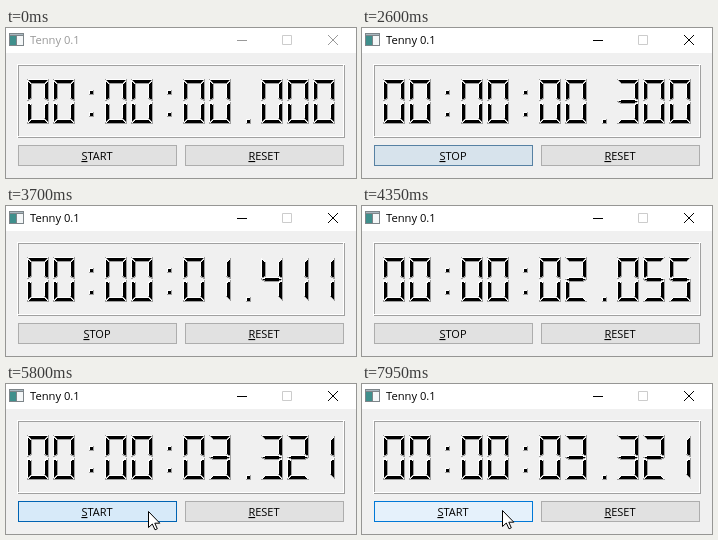
Animation, 350 px wide and 150 px high, one loop 8000 ms. Source, as an HTML page:

```html
<!DOCTYPE html>
<html>
<head>
<meta charset="utf-8">
<title>Stopwatch</title>
<style>
html, body { margin: 0; width: 100%; height: 100%; overflow: hidden; background: #f0f0f0; }
svg { display: block; }
text { font-family: "Open Sans", "Noto Sans", sans-serif; }
.label { font-size: 11px; text-anchor: middle; }
.key { text-decoration: underline; }
.crisp { shape-rendering: crispEdges; }
</style>
</head>
<body>
<svg width="350" height="150" viewBox="0 0 350 150">
  <rect width="350" height="150" fill="#f0f0f0"/>
  <rect width="350" height="25" fill="#fff"/>

  <g class="crisp">
    <rect x="3" y="5" width="15" height="13" fill="#7d8589"/>
    <rect x="4" y="6" width="13" height="1" fill="#a9b8c0"/>
    <rect x="4" y="8" width="6" height="9" fill="#3f8f8c"/>
    <rect x="11" y="8" width="6" height="9" fill="#f4f7f8"/>
  </g>
  <text id="title" x="24" y="16" font-size="11.2">Tenny 0.1</text>
  <g id="controls" fill="none">
    <path d="M231 12.5h10"/>
    <path d="M276.5 7.5h9v9h-9z" stroke="#ccc"/>
    <path d="M322 7l10 10M332 7l-10 10"/>
  </g>

  <g class="crisp" fill="none">
    <path d="M11.5 109.5V36.5H338.5M337.5 37V108.5H12" stroke="#fff"/>
    <path d="M12.5 108V37.5H337M338.5 37V109.5H12" stroke="#a0a0a0"/>
  </g>
  <g id="lcd" class="crisp" stroke-linecap="square"></g>

  <rect id="toggle" x="12.5" y="117.5" width="158" height="20"/>
  <text class="label" x="91" y="132"><tspan class="key">S</tspan><tspan id="rest">TART</tspan></text>
  <rect x="179.5" y="117.5" width="158" height="20" fill="#e1e1e1" stroke="#adadad"/>
  <text class="label" x="258" y="132"><tspan class="key">R</tspan>ESET</text>

  <path id="cursor" d="M.5 .5V16.5L4.3 13L7 18.8L9.3 17.8L6.8 12.2H11.8Z" fill="#fff" stroke="#000"/>
</svg>
<script>
const LOOP = 8000, STEP = 50, START = 2295, STOP = 5616, FOCUS = 2250;
const el = id => document.getElementById(id);

// Each segment: origin, then corners as [x, y, lit edge?]
const dot = [[4, 0, 0], [4, -4, 0], [0, -4, 1], [0, 0, 1]];
const segments = [
  [0, 0, [[21, 0, 1], [17, 4, 0], [4, 4, 0], [0, 0, 0]]],
  [0, 1, [[4, 4, 1], [4, 18, 0], [0, 20, 0], [0, 0, 1]]],
  [21, 1, [[0, 20, 0], [-4, 18, 0], [-4, 4, 1], [0, 0, 1]]],
  [0, 22, [[4, -2, 1], [17, -2, 1], [21, 0, 1], [17, 2, 0], [4, 2, 0], [0, 0, 0]]],
  [0, 23, [[4, 2, 1], [4, 16, 0], [0, 20, 0], [0, 0, 1]]],
  [21, 23, [[0, 20, 0], [-4, 16, 0], [-4, 2, 1], [0, 0, 1]]],
  [0, 44, [[4, -4, 1], [17, -4, 1], [21, 0, 1], [0, 0, 0]]],
  [11, 44, dot],
  [10, 15, dot],
  [10, 37, dot]
];
const glyphs = {
  0: '012456', 1: '25', 2: '02346', 3: '02356', 4: '1235', 5: '01356',
  6: '013456', 7: '025', 8: '0123456', 9: '012356', ':': '89', '.': '7'
};

function segment([ox, oy, corners]) {
  const edges = ['', ''];
  let from = '0.5 0.5';
  for (const [x, y, lit] of corners) {
    const to = `${x + .5} ${y + .5}`;
    edges[lit] += `M${from}L${to}`;
    from = to;
  }
  const body = corners.map(c => c[0] + ',' + c[1]).join(' ');
  return `<g transform="translate(${ox} ${oy})"><polygon points="${body}"/>` +
    `<path d="${edges[1]}" stroke="#fff"/><path d="${edges[0]}" stroke="#a0a0a0"/></g>`;
}

const glyph = (ch, i) => `<g transform="translate(${21 + 26 * i} 51)">` +
  [...glyphs[ch]].map(n => segment(segments[n])).join('') + '</g>';

// Linear interpolation through keys of [time, ...values]
function track(keys, t) {
  const n = keys.findIndex(k => k[0] > t);
  if (n < 0) return keys[keys.length - 1].slice(1);
  if (n === 0) return keys[0].slice(1);
  const a = keys[n - 1], b = keys[n], u = (t - a[0]) / (b[0] - a[0]);
  return a.slice(1).map((v, i) => v + (b[i + 1] - v) * u);
}

// Fill and border colours of the button states
const normal = [225, 225, 225, 173, 173, 173];
const hot = [229, 241, 251, 0, 120, 215];
const pressed = [204, 228, 247, 0, 84, 153];
const buttonKeys = [
  [1800, ...normal], [1950, ...hot], [2240, ...hot], [2280, ...pressed],
  [2380, ...pressed], [2820, ...normal],
  [5350, ...normal], [5480, ...hot], [5520, ...hot], [5560, ...pressed],
  [STOP, ...pressed], [6050, ...hot]
];
const cursorKeys = [
  [1550, 130, 151], [1700, 132, 139], [1900, 137, 128], [2380, 137, 128], [2530, 134, 152],
  [2531, 150, 152], [5150, 150, 152], [5400, 142, 127], [7300, 142, 127], [7900, 140, 126]
];
const clockKeys = [[START, 0], [2600, 300], [3700, 1411], [4350, 2055], [STOP, 3321]];

const pad = (n, size) => String(n).padStart(size, '0');
const rgb = c => `rgb(${c.map(Math.round)})`;
let shown = '';

function draw(now) {
  const t = Math.floor(now % LOOP / STEP) * STEP;

  const ms = Math.round(track(clockKeys, t)[0]);
  const time = `00:00:${pad(Math.floor(ms / 1000), 2)}.${pad(ms % 1000, 3)}`;
  if (time !== shown) {
    el('lcd').innerHTML = [...time].map(glyph).join('');
    shown = time;
  }

  const ink = t < FOCUS ? '#999' : '#000';
  el('title').setAttribute('fill', ink);
  el('controls').setAttribute('stroke', ink);

  const colors = track(buttonKeys, t);
  el('toggle').setAttribute('fill', rgb(colors.slice(0, 3)));
  el('toggle').setAttribute('stroke', rgb(colors.slice(3)));
  el('rest').textContent = t >= START && t < STOP ? 'TOP' : 'TART';

  const [x, y] = track(cursorKeys, t).map(Math.round);
  el('cursor').setAttribute('transform', `translate(${x} ${y})`);
}

let begin;
function tick(now) {
  begin ??= now;
  draw(now - begin);
  requestAnimationFrame(tick);
}
draw(0);
requestAnimationFrame(tick);
</script>
</body>
</html>
```
